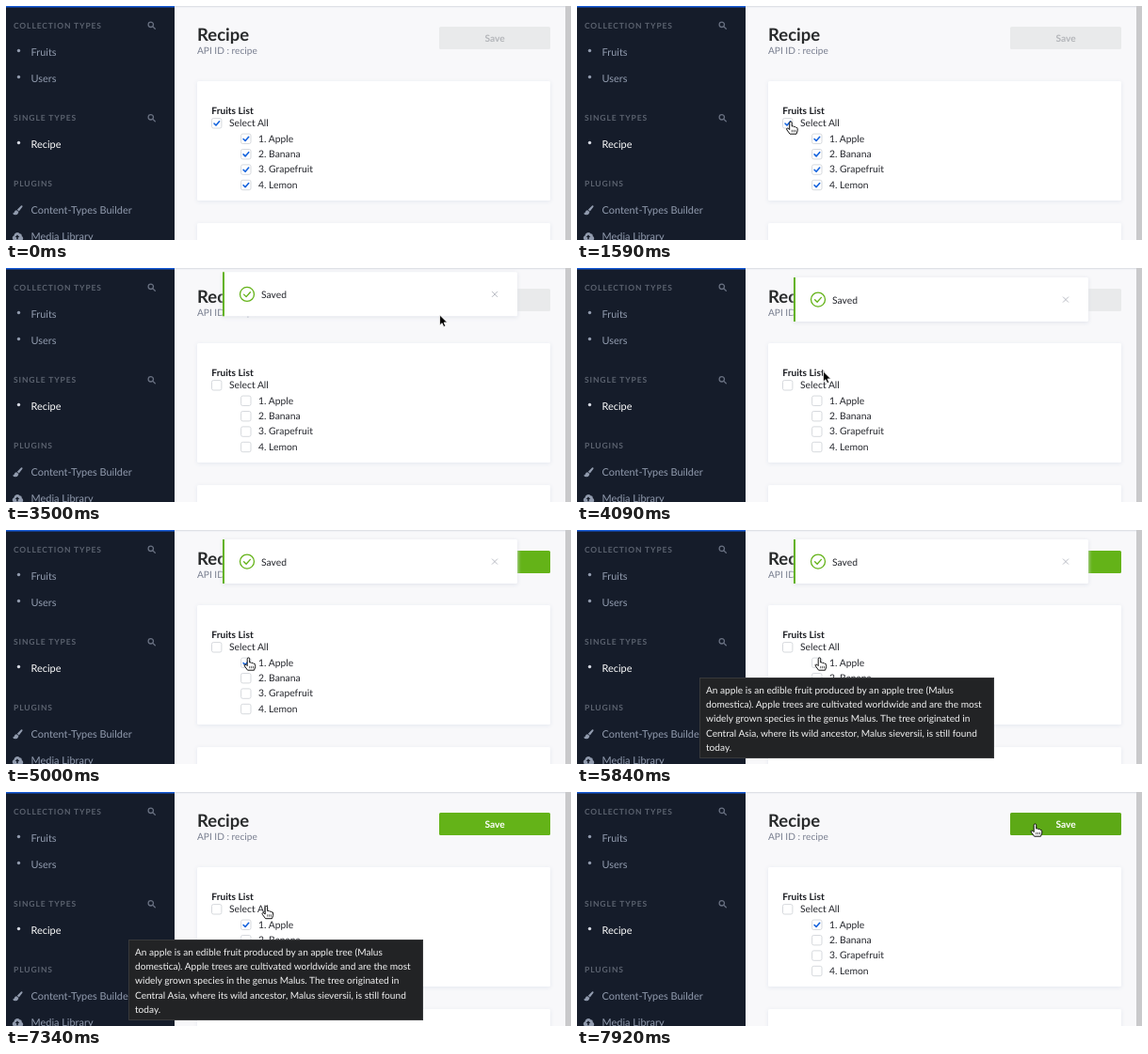
Write an HTML page that moves like this. It is 600 by 249 pixels and loops after 8 s.

```html
<!DOCTYPE html>
<html lang="en">
<head>
<meta charset="utf-8">
<title>Recipe editor</title>
<style>
html, body { margin: 0; width: 100%; height: 100%; overflow: hidden; background: #f8f8fa; }
svg { display: block; width: 600px; height: 249px; }
text { font: 10.35px Lato, sans-serif; fill: #25272d; text-rendering: geometricPrecision; white-space: pre; }
.head { font-size: 8.5px; font-weight: 700; letter-spacing: .88px; fill: #5b626f; }
.link { font-size: 10.95px; fill: #919bae; }
.active { fill: #fff; }
.title { font-size: 18.5px; font-weight: 700; fill: #292b2c; }
.sub { font-size: 10.15px; fill: #787e8f; }
.bold { font-size: 10.2px; font-weight: 700; fill: #1b1d22; }
.tip { font-size: 10.15px; fill: #f1f1f1; }
.line { fill: none; stroke-linecap: round; stroke-linejoin: round; }
.card { fill: #fff; filter: drop-shadow(0 1px 2px #e3e7ef); }
.toast { fill: #fff; filter: drop-shadow(0 1px 2px #dfe2ea); }
.box { fill: #fff; stroke: #d2d5da; stroke-width: .9; }
.tick { stroke: #1463dd; stroke-width: 1.6; }
</style>
</head>
<body>
<svg viewBox="0 0 600 249">
  <defs>
    <g id="search" class="line" stroke="#687081" stroke-width="1.3">
      <circle r="2.7" cx="-.7" cy="-.7"/><path d="M1.4 1.4L3.8 3.8"/>
    </g>
  </defs>

  <rect width="600" height="249" fill="#f8f8fa"/>
  <rect x="179" width="415" height="1.3" fill="#dfe1e6"/>
  <rect x="594" width="6" height="249" fill="#c9c9cb"/>

  <rect width="179" height="249" fill="#151c2a"/>
  <rect width="179" height="1.5" fill="#1459d6"/>
  <use href="#search" x="154.5" y="20.5"/>
  <use href="#search" x="154.5" y="119"/>
  <g fill="#919bae">
    <circle cx="13.5" cy="47.5" r="1.7"/>
    <circle cx="13.5" cy="75.5" r="1.7"/>
    <circle cx="13.5" cy="145.5" r="1.7" fill="#d5d9e2"/>
    <path d="M17 212.2q1 .6.4 1.6l-3.6 4.6-2-1.7 4.2-4.2q.5-.5 1-.3zM11.2 217.3l2.1 1.8q-.2 3-3 3.2-2.5.1-3.3-1.9 1.3.4 1.7-.9.7-2.2 2.5-2.2z"/>
    <path d="M9 249.5a2.7 2.7 0 0 1-.5-5.2 3.4 3.4 0 0 1 6.1-2 2.3 2.3 0 0 1 2.1 2.8 2.3 2.3 0 0 1-.3 4.4z"/>
    <path d="M12 243.6l2.3 2.4h-1.5v2.2h-1.6V246H9.7z" fill="#151c2a"/>
  </g>

  <rect class="card" x="203" y="80" width="375" height="127" rx="1.5"/>
  <rect class="card" x="203" y="231" width="375" height="30" rx="1.5"/>
  <g id="labels"></g>
  <g id="boxes"></g>

  <rect id="button" x="460" y="22" width="118" height="24" rx="1.5"/>
  <text id="save" class="bold" x="519" y="37.6" text-anchor="middle">Save</text>

  <g id="toast">
    <rect class="toast" x="230" y="10" width="313" height="47" rx="1.5"/>
    <rect x="230" y="10" width="2" height="47" fill="#64b318"/>
    <g class="line" stroke="#64b318" stroke-width="1.3">
      <circle cx="256" cy="33.6" r="7.5"/><path d="M252.6 33.8l2.5 2.5 4.3-4.9"/>
    </g>
    <text x="271" y="37.5">Saved</text>
    <path class="line" d="M516.3 30.9l5.4 5.4m0-5.4l-5.4 5.4" stroke="#b9bcc4"/>
  </g>

  <g id="tooltip"><rect x="130.5" y="157.5" width="312" height="85" fill="#222325" stroke="#38393b"/></g>

  <g id="cursor" stroke-linejoin="round">
    <path id="arrow" d="M0 0V11l2.5-2.3 1.7 3.9 2-.9L4.5 8H8z" fill="#000" stroke="#fff" stroke-width=".8"/>
    <g id="hand" fill="#fff" stroke="#111">
      <path d="M-1.3 1.2a1.25 1.25 0 0 1 2.5 0V5q1.8-.6 2.2.6 1.7-.5 2.1.7 1.6-.3 1.7 1.2V9.8l-1.2 3.4H-.9L-4 9q-1-1.6.2-2 1.2-.2 2.5 1.6z"/>
      <path d="M1.2 8.8v2.4M3.1 8.8v2.4M5 8.8v2.4" stroke-width=".7"/>
    </g>
  </g>
</svg>
<script>
const $ = id => document.getElementById(id);
const LOOP = 8000, FPS = 12;
const GREEN = '#64b318', GREEN_HOVER = '#5da916', GREY = '#e9eaeb';

function add(parent, tag, attrs, content = '') {
  const el = document.createElementNS('http://www.w3.org/2000/svg', tag);
  for (const key in attrs) el.setAttribute(key, attrs[key]);
  el.textContent = content;
  return parent.appendChild(el);
}

const label = (x, y, content, cls = '', parent = $('labels')) =>
  add(parent, 'text', { x, y, class: cls }, content);

label(8, 23.5, 'COLLECTION TYPES', 'head');
label(8, 122, 'SINGLE TYPES', 'head');
label(8, 192, 'PLUGINS', 'head');
label(26.5, 52.5, 'Fruits', 'link');
label(26.5, 80.5, 'Users', 'link');
label(26.5, 150.7, 'Recipe', 'link active');
label(26.5, 221, 'Content-Types Builder', 'link');
label(26.5, 249, 'Media Library', 'link');
label(203, 37, 'Recipe', 'title');
label(203, 51.3, 'API ID : recipe', 'sub');
label(218.3, 114.8, 'Fruits List', 'bold');
label(237, 128.4, 'Select All');

function checkbox(x, y) {
  add($('boxes'), 'rect', { x, y, width: 10.4, height: 10.4, rx: 1.8, class: 'box' });
  return add($('boxes'), 'path', { d: `M${x + 2.5} ${y + 5.4}l2 2 3.6-4.2`, class: 'line tick' });
}

const ticks = [checkbox(218.5, 119.6)];
['Apple', 'Banana', 'Grapefruit', 'Lemon'].forEach((fruit, i) => {
  const y = 144.6 + i * 16.4;
  label(268, y, `${i + 1}. ${fruit}`);
  ticks.push(checkbox(249.6, y - 8.5));
});

[
  'An apple is an edible fruit produced by an apple tree (Malus',
  'domestica). Apple trees are cultivated worldwide and are the most',
  'widely grown species in the genus Malus. The tree originated in',
  'Central Asia, where its wild ancestor, Malus sieversii, is still found',
  'today.'
].forEach((line, i) => label(137, 173.6 + i * 15.3, line, 'tip', $('tooltip')));

// Pointer stops: time, x, y
const path = [
  [420, 466, 38], [1170, 230, 146], [1420, 227, 123], [1920, 227, 123],
  [2590, 487, 42], [3340, 487, 42], [4090, 261.5, 110], [4500, 257.5, 136],
  [7000, 257.5, 136], [7340, 276.5, 121.5], [7840, 486.5, 34], [8000, 486.5, 34]
];

const progress = (t, from, to) => Math.min(1, Math.max(0, (t - from) / (to - from)));
const ease = p => p * p * (3 - 2 * p);
const within = (t, from, to) => t >= from && t < to;
const show = (el, on) => el.style.display = on ? '' : 'none';

function pointer(t) {
  const i = Math.max(1, path.findIndex(stop => t < stop[0]));
  const [a, b] = [path[i - 1], path[i]];
  const p = ease(progress(t, a[0], b[0]));
  return [a[1] + (b[1] - a[1]) * p, a[2] + (b[2] - a[2]) * p];
}

function draw(t) {
  const [x, y] = pointer(t);
  const inside = (x1, y1, x2, y2) => x >= x1 && x <= x2 && y >= y1 && y <= y2;
  const enabled = within(t, 1660, 3080) || t >= 4830;
  const overSave = enabled && inside(460, 22, 578, 46);
  const overLabel = inside(218, 118, 280, 131) || inside(249, 134, 326, 196);

  // Apple is ticked, cleared and ticked again
  const apple = within(t, 4830, 5500) || t >= 6500;
  ticks.forEach((tick, i) => show(tick, t < 1660 || (i === 1 && apple)));
  $('button').setAttribute('fill', overSave ? GREEN_HOVER : enabled ? GREEN : GREY);
  $('save').style.fill = enabled ? '#fff' : '#b4b6ba';

  show($('toast'), within(t, 3240, 6160));
  $('toast').setAttribute('transform', `translate(0 ${-60 * (1 - ease(progress(t, 3160, 3580)))})`);
  $('toast').setAttribute('opacity', 1 - progress(t, 5910, 6160));

  show($('tooltip'), within(t, 5410, 7580));
  $('tooltip').setAttribute('opacity', 1 - progress(t, 7410, 7580));

  show($('cursor'), t >= 410);
  $('cursor').setAttribute('transform', `translate(${x} ${y})`);
  show($('hand'), overSave || overLabel);
  show($('arrow'), !(overSave || overLabel));
}

const start = performance.now();
function tick(now) {
  const t = Math.max(0, now - start) % LOOP;
  draw(Math.floor(t * FPS / 1000) * 1000 / FPS);
  requestAnimationFrame(tick);
}
draw(0);
requestAnimationFrame(tick);
</script>
</body>
</html>
```
